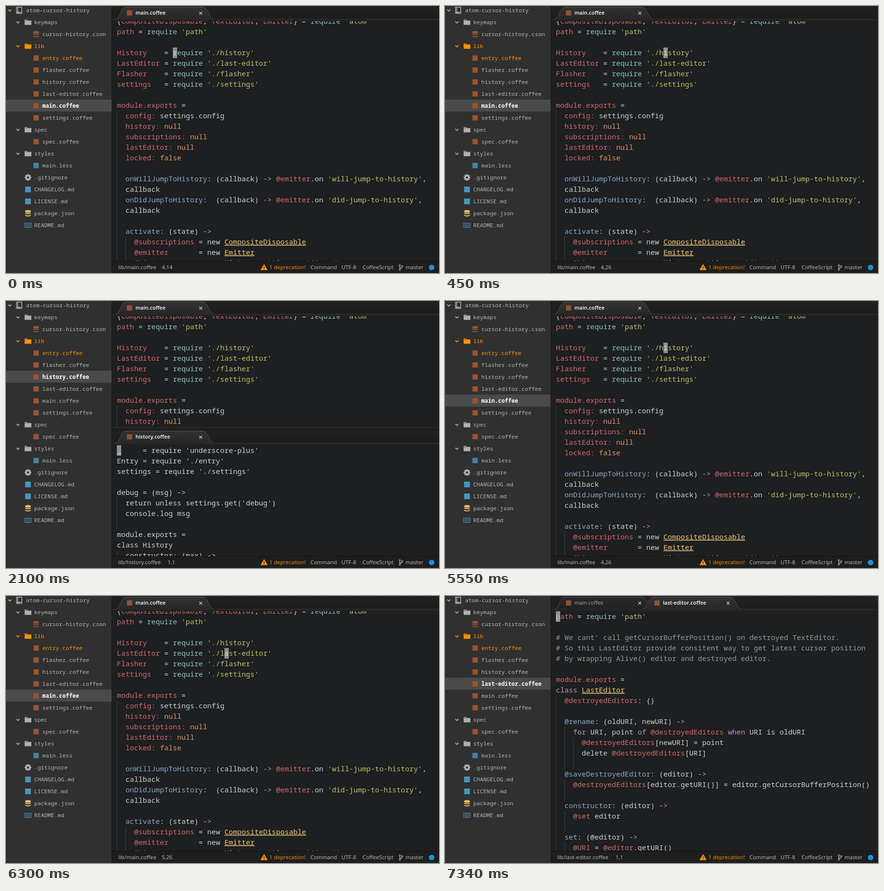
Recreate the animation shown at these times as an HTML page. Size 906 by 559 pixels, loop 8000 ms.

```html
<!DOCTYPE html>
<html lang="en">
<head>
<meta charset="utf-8">
<title>Editor cursor history</title>
<style>
html, body { margin: 0; width: 100%; height: 100%; overflow: hidden; background: #1d1f21; }
svg { display: block; width: 906px; height: 559px; }
text { white-space: pre; }
.code { font: 500 15px "Noto Sans Mono", monospace; fill: #cdd0ce; }
.r { fill: #d2686a; }
.g { fill: #b9c263; }
.o { fill: #e2965f; }
.y { fill: #f0c674; text-decoration: underline; }
.b { fill: #86a8c5; }
.p { fill: #b898c2; }
.a { fill: #8cc4bb; }
.c { fill: #969896; }
.raw tspan { fill: #cdd0ce; text-decoration: none; }
.tree { font: 500 11.667px "Noto Sans Mono", monospace; fill: #b4b4b4; }
.tree .mod { fill: #ff9300; }
.tree .on { fill: #fff; font-weight: 600; }
.title { font: 600 11px "Open Sans", sans-serif; fill: #fff; }
.status { font: 500 11.4px "Open Sans", sans-serif; fill: #c0c0c0; }
.warn { fill: #ff9300; }
</style>
</head>
<body>
<script>
const LOOP = 8000, LEFT = 232, COL = 9, ROW = 22;

// Code markup: ~xtext~ gives text the colour class x.
const CODE = {
  main: `{~rCompositeDisposable~, ~rTextEditor~, ~rEmitter~} = ~arequire~ ~g'atom'~
~rpath~ = ~arequire~ ~g'path'~

~rHistory~    = ~arequire~ ~g'./history'~
~rLastEditor~ = ~arequire~ ~g'./last-editor'~
~rFlasher~    = ~arequire~ ~g'./flasher'~
~rsettings~   = ~arequire~ ~g'./settings'~

~rmodule.exports~ =
  ~rconfig:~ settings.config
  ~rhistory:~ ~onull~
  ~rsubscriptions:~ ~onull~
  ~rlastEditor:~ ~onull~
  ~rlocked:~ ~ofalse~

  ~bonWillJumpToHistory~: (callback) ~p->~ ~r@emitter~.on ~g'will-jump-to-history'~,
  callback
  ~bonDidJumpToHistory~:  (callback) ~p->~ ~r@emitter~.on ~g'did-jump-to-history'~,
  callback

  ~bactivate~: (state) ~p->~
    ~r@subscriptions~ = new ~yCompositeDisposable~
    ~r@emitter~       = new ~yEmitter~
    ~r@history~       = new ~yHistory~ settings.get(~g'max'~)`,

  history: `~r_~     = ~arequire~ ~g'underscore-plus'~
~rEntry~ = ~arequire~ ~g'./entry'~
~rsettings~ = ~arequire~ ~g'./settings'~

~bdebug~ = (msg) ~p->~
  ~preturn unless~ settings.get(~g'debug'~)
  ~yconsole~.~alog~ msg

~rmodule.exports~ =
~pclass~ ~yHistory~
  ~bconstructor~: (max) ~p->~`,

  last: `~rpath~ = ~arequire~ ~g'path'~

~c# We cant' call getCursorBufferPosition() on destroyed TextEditor.~
~c# So this LastEditor provide consitent way to get latest cursor position~
~c# by wrapping Alive() editor and destroyed editor.~

~rmodule.exports~ =
~pclass~ ~yLastEditor~
  ~r@destroyedEditors~: {}

  ~b@rename~: (oldURI, newURI) ~p->~
    ~pfor~ URI, point ~pof~ ~r@destroyedEditors~ ~pwhen~ URI is oldURI
      ~r@destroyedEditors~[newURI] = point
      delete ~r@destroyedEditors~[URI]

  ~b@saveDestroyedEditor~: (editor) ~p->~
    ~r@destroyedEditors~[editor.getURI()] = editor.getCursorBufferPosition()

  ~bconstructor~: (editor) ~p->~
    ~r@set~ editor

  ~bset~: (@editor) ~p->~
    ~r@URI~ = ~r@editor~.getURI()`
};

// view: top of first row, file, x of cursor position label, tree row
const VIEWS = {
  main: { top: 21, file: 'main', posX: 326, row: 8 },
  history: { top: 302, file: 'history', posX: 338, row: 6 },
  last: { top: 32, file: 'last-editor', posX: 357, row: 7 }
};

// [time, view, line, column, stage]
const STEPS = [
  [0, 'main', 4, 14],
  [150, 'main', 4, 19],
  [300, 'main', 4, 23],
  [450, 'main', 4, 26],
  [2100, 'history', 1, 1, 'raw'],
  [2250, 'history', 1, 1],
  [5550, 'main', 4, 26],
  [6300, 'main', 5, 26],
  [7190, 'last', 1, 1, 'fade'],
  [7340, 'last', 1, 1]
];

// [depth, name, icon]
const TREE = [
  [0, 'atom-cursor-history', 'repo'],
  [1, 'keymaps', 'folder'],
  [2, 'cursor-history.cson', 'data'],
  [1, 'lib', 'folder'],
  [2, 'entry.coffee', 'coffee'],
  [2, 'flasher.coffee', 'coffee'],
  [2, 'history.coffee', 'coffee'],
  [2, 'last-editor.coffee', 'coffee'],
  [2, 'main.coffee', 'coffee'],
  [2, 'settings.coffee', 'coffee'],
  [1, 'spec', 'folder'],
  [2, 'spec.coffee', 'coffee'],
  [1, 'styles', 'folder'],
  [2, 'main.less', 'style'],
  [1, '.gitignore', 'gear'],
  [1, 'CHANGELOG.md', 'doc'],
  [1, 'LICENSE.md', 'doc'],
  [1, 'package.json', 'data'],
  [1, 'README.md', 'book']
];

const rect = (x, y, w, h, fill, more = '') =>
  `<rect x="${x}" y="${y}" width="${w}" height="${h}" fill="${fill}" ${more}/>`;
const path = (d, fill, stroke = 'none', w = 1) =>
  `<path d="${d}" fill="${fill}" stroke="${stroke}" stroke-width="${w}"/>`;
const text = (x, y, s, more = '') => `<text x="${x}" y="${y}" ${more}>${s}</text>`;
const group = (more, ...parts) => `<g ${more}>${parts.join('')}</g>`;
const at = (x, y, s) => group(`transform="translate(${x} ${y})"`, s);
const square = (size, fill) => rect(-size / 2, -size / 2, size, size, fill);
const escape = s => s.replace(/&/g, '&amp;').replace(/</g, '&lt;').replace(/>/g, '&gt;');

function codeBlock(name) {
  let depth = 0;
  return CODE[name].split('\n').map((line, i) => {
    const y = VIEWS[name].top + i * ROW;
    const indent = line.match(/^ */)[0].length;
    if (line) depth = indent / 2;
    let out = '';
    for (let d = 0; d < depth; d++) out += rect(LEFT + d * 2 * COL, y, 1, ROW, '#3c3f41');
    const spans = line.slice(indent).split('~').map((s, k) =>
      k % 2 ? `<tspan class="${s[0]}">${escape(s.slice(1))}</tspan>` : escape(s));
    return out + text(LEFT + indent * COL, y + 16, spans.join(''));
  }).join('');
}

function gear() {
  let teeth = '';
  for (let i = 0; i < 8; i++) teeth += rect(-1.5, -7, 3, 4, '#b4b4b4', `transform="rotate(${i * 45})"`);
  return teeth + '<circle r="3.7" fill="none" stroke="#b4b4b4" stroke-width="3"/>';
}

function dataIcon(fill) {
  return path('M-6 -4.6A6 2.2 0 0 1 6 -4.6V-3.4A6 2.2 0 0 1 -6 -3.4Z', fill) +
    [-1.6, 2.9].map(y => path(`M-6 ${y}Q0 ${y + 3.4} 6 ${y}V${y + 2}Q0 ${y + 5.4} -6 ${y + 2}Z`, fill)).join('');
}

const ICONS = {
  repo: () => path('M-5 -6.5H6V4H-5ZM-5 4V6.5H-3M1 6.5H6V4M-2.5 -6V4', 'none', '#b4b4b4', 1.4) +
    path('M-3 4H1V8L-1 6.5L-3 8Z', '#b4b4b4'),
  folder: color => path('M-7 -5.5H-1.5L-.5 -3.5H7V5.5H-7Z', color) +
    path('M-6 -3.6H-1.5', 'none', '#303030', .8),
  coffee: () => square(11, '#98542f'),
  style: () => square(11, '#4584a3'),
  doc: () => square(12, '#4b93b8'),
  data: (color, depth) => dataIcon(depth === 2 ? '#8f5638' : '#e8bd6c'),
  gear,
  book: () => path('M-7 -4.5H-1L0 -3.5L1 -4.5H7V4.5H1L0 5.5L-1 4.5H-7ZM0 -3.5V5M-5 -2H-2M-5 0H-2M-5 2H-2M2 -2H5M2 0H5M2 2H5',
    'none', '#4b93b8', 1.1)
};

function treeRow([depth, name, icon], i) {
  const y = 9 + 25 * i;
  const color = name === 'lib' ? '#ff9300' : '#b0b0b0';
  const mod = name === 'lib' || name === 'entry.coffee';
  const open = icon === 'folder' || icon === 'repo';
  return (open ? at([8, 25][depth], y, path('M-3.2 -1.6L0 1.8L3.2 -1.6', 'none', color, 1.7)) : '') +
    at([27, 46, 63][depth], y, ICONS[icon](color, depth)) +
    text([42, 59, 76][depth], y + 4, name, `data-row="${i}" ${mod ? 'class="mod"' : ''}`);
}

const tab = (x, name, id, shade = 'tab') => at(x, 0,
  path('M230 27.5q4 -1 7 -7l6 -13q3 -5 8 -5h161q5 0 8 5l7 13q3 6 7 7', `url(#${shade})`, '#505050') +
  at(258.5, 14.5, square(11, '#8f5030')) +
  text(271, 18, name + '.coffee', `class="title" id="${id}"`) +
  path('M404.5 12L410.5 18M410.5 12L404.5 18', 'none', '#bbb', 1.6));

const bar = () => rect(222, 0, 684, 32, 'url(#bar)') + rect(222, 27, 684, 1, '#333') +
  rect(222, 28, 684, 4, '#232323');

const gradient = (id, from, to) =>
  `<linearGradient id="${id}" x2="0" y2="1"><stop stop-color="${from}"/><stop offset="1" stop-color="${to}"/></linearGradient>`;

const statusBar = group('class="status"',
  rect(222, 534, 684, 25, '#1e1e1e'), rect(222, 534, 684, 1, '#111'),
  text(235, 551, '', 'id="file"'), text(326, 551, '', 'id="pos"'),
  path('M540 541.5L546.5 552.5H533.5Z', '#ff9300', '#ff9300', 1.2),
  path('M540 545V549M540 550V551.5', 'none', '#1e1e1e', 1.5),
  text(551, 551, '1 deprecation!', 'class="warn"'),
  text(637, 551, 'Command'), text(702, 551, 'UTF-8'), text(746, 551, 'CoffeeScript'),
  path('M824 544V551M824 549Q829 549 829 546', 'none', '#c0c0c0', 1.3),
  [[824, 543], [824, 552], [829, 545]].map(([x, y]) =>
    `<circle cx="${x}" cy="${y}" r="1.6" fill="#1e1e1e" stroke="#c0c0c0"/>`).join(''),
  text(836, 551, 'master'),
  '<circle cx="890.5" cy="547.5" r="5.8" fill="#1e90e0"/>');

document.body.innerHTML = '<svg viewBox="0 0 906 559"><defs>' +
  gradient('bar', '#212121', '#1c1c1c') + gradient('tab', '#323232', '#272727') +
  gradient('idle', '#292929', '#212121') + '</defs>' +
  rect(0, 0, 906, 559, '#1d1f21') +
  group('class="code" id="mainCode"', codeBlock('main')) +
  group('id="split"',
    rect(222, 265, 684, 294, '#1d1f21'),
    group('class="code" id="historyCode"', codeBlock('history')),
    rect(222, 265, 684, 6, '#1c1c1c'), rect(222, 265, 684, 1, '#353535'),
    at(0, 270, bar() + tab(0, 'history', 'historyTab'))) +
  group('class="code" id="lastCode"', codeBlock('last')) +
  rect(0, 0, COL, ROW, 'rgba(255,255,255,.5)', 'id="cursor"') +
  bar() +
  group('id="oneTab"', tab(0, 'main', 'mainTab')) +
  group('id="twoTabs"', tab(0, 'main', 'idleTab', 'idle'), tab(185, 'last-editor', 'lastTab')) +
  statusBar +
  rect(0, 0, 221, 559, '#303030') + rect(221, 0, 1, 559, '#151515') +
  rect(0, 0, 221, 25, '#4a4a4a', 'id="selected"') +
  group('class="tree"', TREE.map(treeRow).join('')) + '</svg>';

const $ = id => document.getElementById(id);
const set = (id, name, value) => $(id).setAttribute(name, value);
const show = (id, on) => set(id, 'visibility', on ? 'visible' : 'hidden');
const names = document.querySelectorAll('[data-row]');
let current;

function draw(step) {
  const [, name, line, col, stage] = step;
  const view = VIEWS[name];
  const last = name === 'last';
  show('mainCode', !last);
  show('split', name === 'history');
  show('lastCode', last);
  show('oneTab', !last);
  show('twoTabs', last);
  $('historyCode').classList.toggle('raw', stage === 'raw');
  $('idleTab').style.cssText = stage === 'fade' ? 'fill:#d6d6d6' : 'fill:#aaa;font-weight:500';
  $('lastTab').style.fill = stage === 'fade' ? '#c8c8c8' : '#fff';
  set('cursor', 'x', LEFT + (col - 1) * COL);
  set('cursor', 'y', view.top + (line - 1) * ROW);
  $('file').textContent = `lib/${view.file}.coffee`;
  $('pos').textContent = `${line},${col}`;
  set('pos', 'x', view.posX);
  set('selected', 'y', view.row * 25 - 4);
  names.forEach((el, i) => el.classList.toggle('on', i === view.row));
}

function tick() {
  const t = performance.now() % LOOP;
  const step = STEPS.filter(s => s[0] <= t).pop();
  if (step !== current) draw(current = step);
  requestAnimationFrame(tick);
}
tick();
</script>
</body>
</html>
```
